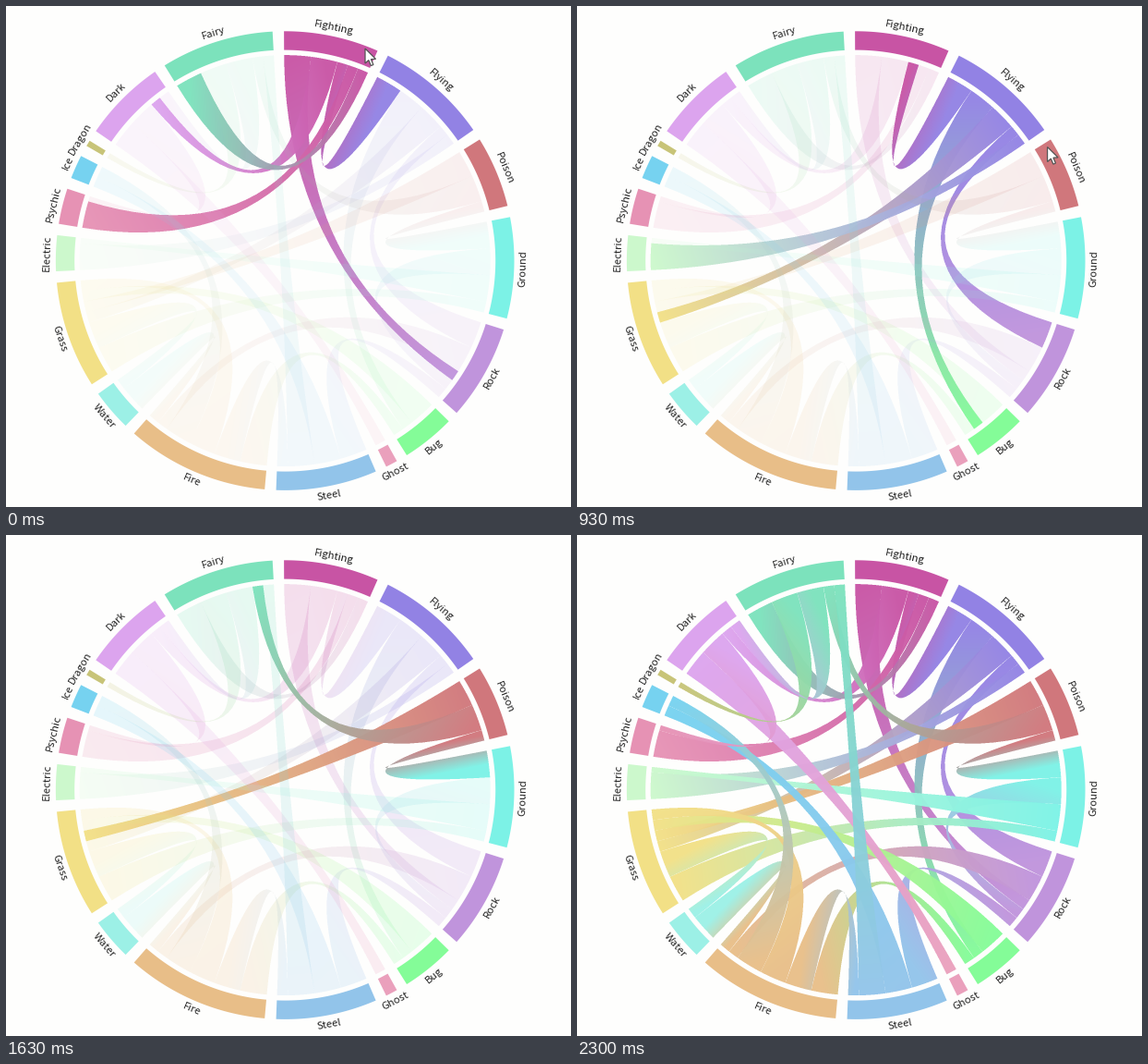
Write a matplotlib script that moves like this. It is 612 px wide and 542 px high and loops after 2330 ms.

```python
import numpy as np
import matplotlib.pyplot as plt
from matplotlib.animation import FuncAnimation
from matplotlib.path import Path
from matplotlib.patches import Polygon

W, H, DPI = 612, 542, 100
LOOP, FRAMES = 2330, 70
CX, CY = 302.2, 275.6
R_OUT, R_IN, R_RIBBON, R_LABEL = 248.3, 228, 222.5, 258
PAD, START = np.degrees(0.05), -0.25
BACK = np.array([254, 254, 253], np.float32)
HIGH, LOW, FADE = 0.96, 0.11, 250
STRONG, WEAK, NONE = 5, 2, 1

COLORS = {
    "Fighting": "#c854a4", "Flying": "#9282e4", "Poison": "#d0777c",
    "Ground": "#7cf2e6", "Rock": "#c094dc", "Bug": "#84fc98",
    "Ghost": "#eaa0bc", "Steel": "#92c4ea", "Fire": "#e8be88",
    "Water": "#9cf0e6", "Grass": "#f2e086", "Electric": "#ccf8cc",
    "Psychic": "#e692b4", "Ice": "#76d2f0", "Dragon": "#c8c478",
    "Dark": "#dca4ee", "Fairy": "#7ce2bc",
}
NAMES = list(COLORS)

BEATS = {
    "Fighting": "Rock Dark", "Flying": "Fighting Bug Grass",
    "Poison": "Grass Fairy", "Ground": "Poison Rock Electric",
    "Rock": "Flying Fire", "Bug": "Grass", "Steel": "Rock Ice Fairy",
    "Fire": "Bug Steel Grass Ice", "Water": "Fire", "Grass": "Ground Water",
    "Electric": "Flying", "Psychic": "Fighting", "Dark": "Ghost Psychic",
    "Fairy": "Fighting Dragon Dark",
}
IMMUNE = {("Electric", "Ground"), ("Psychic", "Dark"), ("Dragon", "Fairy")}

# Pointer events: time and the group entered, or None on leaving
EVENTS = [(70, None), (130, "Flying"), (850, None), (925, "Poison"), (1560, None)]
FIRST = "Fighting"
POINTER_T = [0, 300, 720, 925, 1230, 1470, 1615]
POINTER_X = [389, 448, 452, 518, 520, 522, 566]
POINTER_Y = [46, 84, 88, 162, 165, 166, 172]


def rgb(name):
    code = COLORS[name]
    return np.array([int(code[i:i + 2], 16) for i in (1, 3, 5)], np.float32)


def polar(deg, r):
    a = np.radians(deg)
    return np.stack([CX + r * np.sin(a), CY - r * np.cos(a)], axis=-1)


def layout():
    """Angles of every group and of every end of a ribbon."""
    n = len(NAMES)
    flow = np.zeros((n, n))
    for winner, losers in BEATS.items():
        for loser in losers.split():
            i, j = NAMES.index(winner), NAMES.index(loser)
            flow[i, j] = STRONG
            flow[j, i] = NONE if (loser, winner) in IMMUNE else WEAK
    unit = (360 - n * PAD) / flow.sum()
    groups, ends, angle = [], {}, START
    for i in range(n):
        first = angle
        for j in sorted(range(n), key=lambda k: -flow[i, k]):
            if flow[i, j]:
                ends[i, j] = (angle, angle + flow[i, j] * unit)
                angle += flow[i, j] * unit
        groups.append((first, angle))
        angle += PAD
    return groups, ends


def through_center(a, b, steps=26):
    t = np.linspace(0, 1, steps)[:, None]
    mid = np.array([CX, CY])
    return (1 - t) ** 2 * polar(a, R_RIBBON) + 2 * t * (1 - t) * mid + t ** 2 * polar(b, R_RIBBON)


def coverage(points, x0, y0, w, h, sub=3):
    xs = x0 + (np.arange(w * sub) + 0.5) / sub
    ys = y0 + (np.arange(h * sub) + 0.5) / sub
    grid = np.stack(np.meshgrid(xs, ys), axis=-1).reshape(-1, 2)
    inside = Path(points).contains_points(grid)
    return inside.reshape(h, sub, w, sub).mean(axis=(1, 3)).astype(np.float32)


def make_ribbon(i, j, ends):
    (a0, a1), (b0, b1) = ends[i, j], ends[j, i]
    points = np.concatenate([
        polar(np.linspace(a0, a1, 8), R_RIBBON), through_center(a1, b0),
        polar(np.linspace(b0, b1, 8), R_RIBBON), through_center(b1, a0),
    ])
    x0, y0 = np.floor(points.min(axis=0)).astype(int)
    x1, y1 = np.ceil(points.max(axis=0)).astype(int)
    mask = coverage(points, x0, y0, x1 - x0, y1 - y0)

    p, q = polar((a0 + a1) / 2, R_RIBBON), polar((b0 + b1) / 2, R_RIBBON)
    d = (q - p) / np.sum((q - p) ** 2)
    xs, ys = np.meshgrid(np.arange(x0, x1) + 0.5, np.arange(y0, y1) + 0.5)
    t = np.clip((xs - p[0]) * d[0] + (ys - p[1]) * d[1], 0, 1)[..., None]
    shade = (rgb(NAMES[i]) * (1 - t) + rgb(NAMES[j]) * t).astype(np.float32)
    area = (slice(y0, y1), slice(x0, x1))
    return {NAMES[i], NAMES[j]}, area, mask[..., None], shade


def ease(t):
    t = min(max(t, 0), 1)
    return 4 * t ** 3 if t < 0.5 else 1 - 4 * (1 - t) ** 3


def opacity(pair, ms):
    begin, old, new = -FADE, LOW, HIGH if FIRST in pair else LOW

    def value(t):
        return old + (new - old) * ease((t - begin) / FADE)

    for time, group in EVENTS:
        if time > ms:
            break
        if group is None or group not in pair:
            begin, old, new = time, value(time), HIGH if group is None else LOW
    return value(ms)


def paint(ms):
    canvas = np.empty((H, W, 3), np.float32)
    canvas[:] = BACK
    for pair, area, mask, shade in ribbons:
        part = canvas[area]
        part += (shade - part) * (mask * np.float32(opacity(pair, ms)))
    return np.clip(canvas + 0.5, 0, 255).astype(np.uint8)


groups, ends = layout()
ribbons = [make_ribbon(i, j, ends) for i, j in sorted(ends) if i < j]

fig = plt.figure(figsize=(W / DPI, H / DPI), dpi=DPI, facecolor=tuple(BACK / 255))
ax = fig.add_axes([0, 0, 1, 1])
picture = ax.imshow(paint(0), extent=(0, W, H, 0), interpolation="nearest", aspect="auto")
ax.set_xlim(0, W)
ax.set_ylim(H, 0)
ax.axis("off")

for name, (a, b) in zip(NAMES, groups):
    arc = np.linspace(a, b, 40)
    ring = np.concatenate([polar(arc, R_OUT), polar(arc[::-1], R_IN)])
    ax.add_patch(Polygon(ring, fc=COLORS[name], ec="none"))
    mid = (a + b) / 2
    x, y = polar(mid, R_LABEL)
    turn = 180 - mid if 90 < mid < 270 else -mid
    ax.text(x, y, name, rotation=turn, rotation_mode="anchor", ha="center", va="center",
            family="Noto Sans CJK JP", size=11.3 * 72 / DPI, color="#222222")

ARROW = np.array([(0, 0), (0, 16), (3.8, 12.6), (6.3, 18.6), (8.9, 17.5), (6.4, 11.6), (11.5, 11.4)])
pointer = ax.add_patch(Polygon(ARROW, fc="white", ec="#555555", lw=0.9, zorder=5))


def update(i):
    ms = i * LOOP / FRAMES
    picture.set_data(paint(ms))
    tip = [np.interp(ms, POINTER_T, POINTER_X), np.interp(ms, POINTER_T, POINTER_Y)]
    pointer.set_xy(ARROW + tip)
    pointer.set_visible(ms < POINTER_T[-1])
    return picture, pointer


anim = FuncAnimation(fig, update, frames=FRAMES, interval=LOOP / FRAMES, repeat=True, repeat_delay=0)
plt.show()
```
